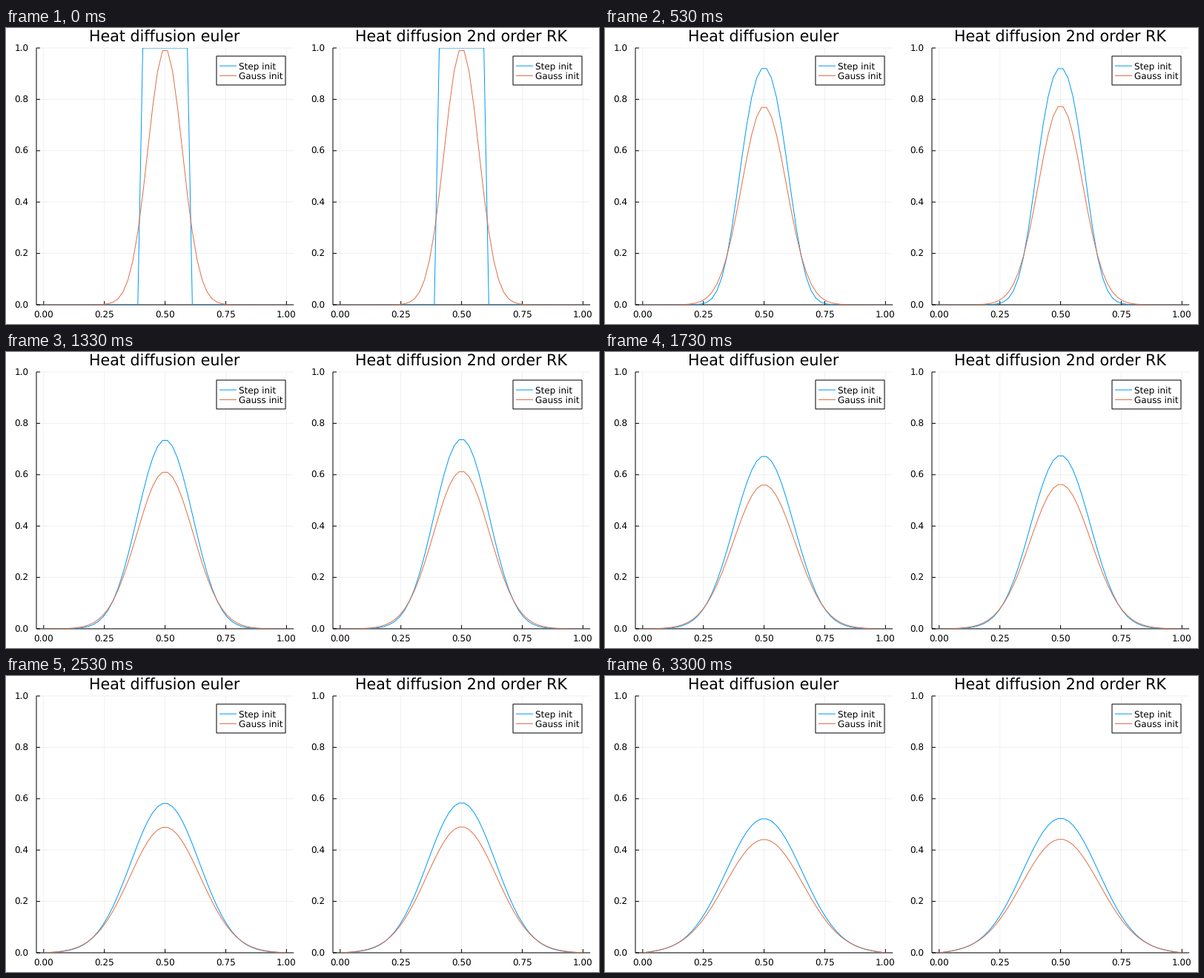
A matplotlib script for the animation above (3330 ms loop, 800 px wide and 400 px high).

```python
import numpy as np
import matplotlib.pyplot as plt
from matplotlib.animation import FuncAnimation
from matplotlib.collections import LineCollection
from matplotlib.lines import Line2D
from matplotlib.patches import Rectangle
from matplotlib.transforms import Affine2D

W, H, DPI = 800, 400, 100
PT = 72 / DPI  # points per pixel
STATES = 100
TICK_MS, LOOP_MS = 10, 3330
BLUE, ORANGE = "#009afa", "#e36f47"
LEFT, RIGHT, TOP, BOTTOM = 41.0, 388.2, 27.0, 374.0

N = 50
RATE = 0.25  # diffusivity * dt / dx^2

plt.rcParams.update({"font.family": "DejaVu Sans", "text.hinting": "none"})

x = np.linspace(0, 1, N)
step_init = ((x > 0.4) & (x < 0.6)).astype(float)
gauss_init = np.exp(-100 * (x - 0.5) ** 2)


def slope(u):
    """Scaled second difference; the end points stay fixed."""
    d = np.zeros_like(u)
    d[:, 1:-1] = RATE * (u[:, 2:] - 2 * u[:, 1:-1] + u[:, :-2])
    return d


def euler(u):
    return u + slope(u)


def midpoint(u):
    return u + slope(u + slope(u) / 2)


def solve(method):
    states = [np.array([step_init, gauss_init])]
    for _ in range(STATES - 1):
        states.append(method(states[-1]))
    return states


fig = plt.figure(figsize=(W / DPI, H / DPI), dpi=DPI, facecolor="white")
# Pixel coordinates with the origin at the top left
px = Affine2D().scale(1 / W, -1 / H).translate(0, 1) + fig.transFigure


def to_x(v):
    return LEFT + (RIGHT - LEFT) * (v + 0.03) / 1.06


def to_y(v):
    return BOTTOM + (TOP - BOTTOM) * v


def add_text(x0, y0, text, size=12, ha="left"):
    fig.text(x0, y0, text, transform=px, fontsize=size * PT, ha=ha,
             va="baseline", zorder=6)


def add_segments(segments, alpha=1):
    fig.add_artist(LineCollection(segments, transform=px, colors="black", lw=PT,
                                  alpha=alpha, snap=False, zorder=1))


def add_line(xs, ys, color, zorder=2):
    line = Line2D(xs, ys, transform=px, color=color, lw=PT, snap=False,
                  solid_joinstyle="miter", solid_capstyle="butt", zorder=zorder)
    return fig.add_artist(line)


def add_axes(dx):
    left, right = dx + LEFT, dx + RIGHT
    grid = []
    axes = [[(left, TOP), (left, BOTTOM)], [(left, BOTTOM), (right, BOTTOM)]]
    for v in np.linspace(0, 1, 5):
        tx = dx + to_x(v)
        grid.append([(tx, TOP), (tx, BOTTOM)])
        axes.append([(tx, BOTTOM), (tx, BOTTOM - 5)])
        add_text(tx, 391.4, f"{v:.2f}", ha="center")
    for v in np.linspace(0, 1, 6):
        ty = to_y(v)
        grid.append([(left, ty), (right, ty)])
        axes.append([(left, ty), (left + 5, ty)])
        add_text(left - 10.5, ty + 4.4, f"{v:.1f}", ha="right")
    add_segments(grid, alpha=0.06)
    add_segments(axes)


def add_legend(dx):
    fig.add_artist(Rectangle((dx + 284, 38), 93, 39, transform=px, fc="white",
                             ec="black", lw=PT, snap=False, zorder=4))
    rows = [("Step init", BLUE, 51.2), ("Gauss init", ORANGE, 64.5)]
    for label, color, y in rows:
        add_line([dx + 288, dx + 311], [y, y], color, zorder=5)
        add_text(dx + 314, y + 4.6, label)


def add_panel(dx, title):
    add_axes(dx)
    add_text(dx + (LEFT + RIGHT) / 2 - 1, 18.5, title, size=20.7, ha="center")
    add_legend(dx)
    view = Rectangle((dx + LEFT, BOTTOM), RIGHT - LEFT, TOP - BOTTOM, transform=px)
    curves = [add_line(dx + to_x(x), to_y(0 * x), c) for c in (BLUE, ORANGE)]
    for curve in curves:
        curve.set_clip_path(view)
    return curves


panels = [
    (add_panel(0, "Heat diffusion euler"), solve(euler)),
    (add_panel(400, "Heat diffusion 2nd order RK"), solve(midpoint)),
]


def draw(tick):
    # 30 states per second, each start rounded to a whole tick
    n = (3 * tick + 1) // 10
    curves = []
    for lines, states in panels:
        for line, u in zip(lines, states[n]):
            line.set_ydata(to_y(u))
            curves.append(line)
    return curves


anim = FuncAnimation(fig, draw, frames=LOOP_MS // TICK_MS, interval=TICK_MS,
                     repeat=True, repeat_delay=0, blit=False)
plt.show()
```
